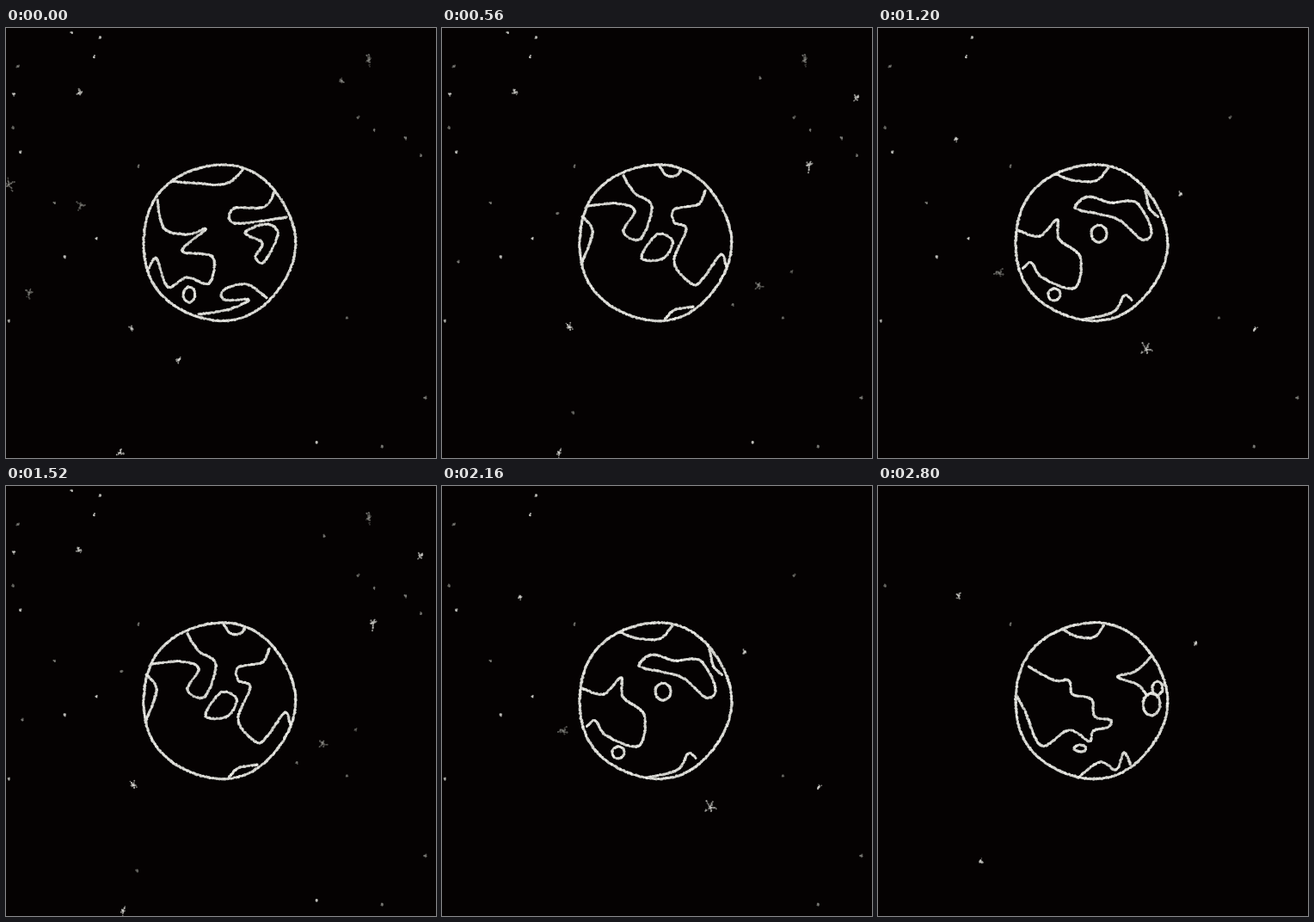
An HTML page with a canvas that plays this animation: 500x500 px, repeating every 2880 ms.

```html
<!DOCTYPE html>
<html lang="en">
<head>
<meta charset="utf-8">
<title>Chalk globe</title>
<style>
  html, body { margin: 0; width: 100%; height: 100%; overflow: hidden; background: #050202; }
  canvas { display: block; }
</style>
</head>
<body>
<canvas id="stage" width="500" height="500"></canvas>
<script>
const ctx = document.getElementById('stage').getContext('2d');
const STEP = 80, STEPS = 12;
const CX = 247.5, CY = 249.5, R = 89.5;
const TAU = Math.PI * 2;

let seed;
function random() {
  seed = (seed * 16807) % 2147483647;
  return seed / 2147483647;
}
const jitter = amount => (random() * 2 - 1) * amount;
const range = n => [...Array(n).keys()];

function triples(text) {
  const n = text.match(/-?\d+/g).map(Number);
  return range(n.length / 3).map(i => n.slice(i * 3, i * 3 + 3));
}

// A hand-drawn line through a few "x y" points.
function coast(text, closed = false) {
  return { closed, points: text.split(', ').map(pair => pair.split(' ').map(Number)) };
}
const island = text => coast(text, true);

function islet(x, y, rx, ry = rx) {
  const points = range(6).map(i => {
    const a = i * TAU / 6 + 0.4;
    return [x + rx * Math.cos(a), y + ry * Math.sin(a)];
  });
  return { closed: true, points };
}

// Polar ice hanging from the rim between two x positions.
function iceCap(x1, x2) {
  const rimY = x => CY - Math.sqrt(R * R - (x - CX) ** 2);
  const width = x2 - x1, edge = 168 + width * 0.16;
  return { closed: false, points: [
    [x1, rimY(x1)], [x1 + width * 0.3, edge - 1], [x1 + width * 0.75, edge], [x2, rimY(x2)]
  ] };
}

// Key views of the globe. turn: degrees per step towards the next view;
// stars: x, y, size (negative is dim); specks: how many faint dots.
const views = [
  {
    at: 0, turn: 8, specks: 20,
    lands: [
      iceCap(193, 276),
      islet(213, 310, 7, 9),
      island('278 238, 303 228, 316 240, 300 272, 290 266, 298 250'),
      coast('312 191, 300 208, 265 210, 266 227, 327 220'),
      coast('176 200, 184 233, 212 240, 232 234, 205 259, 240 266, 236 297, 210 290, 188 301, 175 268, 166 280'),
      coast('303 314, 280 298, 254 304, 254 316, 282 316, 260 327, 224 333')
    ],
    stars: triples('86 75 5, 422 37 -8, 390 61 -4, 3 182 -9, 87 206 -6, 27 308 -7, 146 349 4, 201 386 5, 133 494 7')
  },
  {
    at: 3, turn: 17, specks: 14,
    lands: [
      iceCap(207, 268),
      islet(257, 239, 9, 10),
      islet(205, 310, 7),
      island('230 206, 245 196, 270 203, 300 203, 318 235, 307 246, 278 222, 235 212'),
      coast('311 190, 316 210, 326 220'),
      coast('162 235, 188 242, 208 223, 211 246, 235 266, 229 302, 192 291, 178 273, 168 280'),
      coast('238 339, 274 330, 286 311, 296 317')
    ],
    stars: triples('91 129 4, 352 193 4, 141 285 -8, 438 350 4, 312 374 9')
  },
  {
    at: 7, turn: 21, specks: 26,
    lands: [
      iceCap(253, 278),
      island('232 267, 250 240, 268 248, 257 268'),
      coast('211 172, 224 192, 244 207, 231 245, 211 237, 224 212, 203 204, 170 207'),
      coast('163 219, 175 237, 163 272'),
      coast('306 189, 298 205, 270 211, 270 226, 284 234, 270 272, 291 298, 303 292, 313 278, 325 263, 331 278'),
      coast('260 338, 270 328, 293 324')
    ],
    stars: triples('85 75 5, 422 37 -8, 481 81 6, 427 159 8, 368 299 -8, 148 348 6, 136 494 6')
  },
  {
    at: 11, turn: 17, specks: 2,
    lands: [
      iceCap(215, 263),
      islet(235, 305, 7, 4),
      islet(325, 235, 6, 8),
      islet(318, 254, 10, 13),
      coast('175 210, 205 226, 222 226, 226 242, 248 248, 252 268, 270 272, 268 280, 250 285, 246 297, 222 284, 190 302, 171 262, 162 245'),
      coast('318 198, 300 215, 279 222, 302 231, 312 243'),
      coast('233 339, 258 321, 277 330, 286 310, 294 324')
    ],
    stars: triples('94 128 4, 369 183 3, 119 437 4')
  }
];

seed = 2024;
const specks = range(26).map(() => {
  let x, y;
  do {
    x = random() * 500;
    y = random() * 500;
  } while (Math.hypot(x - CX, y - CY) < 105);
  return [x, y, random() < 0.6 ? -2 : 2];
});

// A slightly uneven circle.
const rim = { closed: true, points: range(36).map(i => {
  const a = i * TAU / 36;
  const r = R - 1.2 * Math.cos(2 * a) + Math.cos(5 * a - 6.5);
  return [CX + r * Math.cos(a), CY + r * Math.sin(a)];
}) };

function dab(x, y, radius, light, alpha) {
  ctx.fillStyle = `rgba(${light}, ${light}, ${light - 5}, ${alpha})`;
  ctx.beginPath();
  ctx.arc(x, y, radius, 0, TAU);
  ctx.fill();
}

const spline = (a, b, c, d, t) =>
  b + 0.5 * t * (c - a + t * (2 * a - 5 * b + 4 * c - d + t * (3 * (b - c) + d - a)));

function chalk({ points, closed }) {
  const n = points.length;
  const pick = i => points[closed ? (i + n) % n : Math.max(0, Math.min(n - 1, i))];
  for (let i = 0; i < (closed ? n : n - 1); i++) {
    const [a, b, c, d] = [-1, 0, 1, 2].map(k => pick(i + k));
    const count = Math.ceil(Math.hypot(c[0] - b[0], c[1] - b[1]) / 1.1);
    for (let k = 0; k < count; k++) {
      const [x, y] = [0, 1].map(j => spline(a[j], b[j], c[j], d[j], k / count));
      dab(x + jitter(0.5), y + jitter(0.5), 1.2 + random() * 0.6, 200 + random() * 45 | 0, 0.85);
    }
  }
}

// Turns a point about the globe's axis; points on the rim stay on it.
function spin([x, y], degrees) {
  const r = Math.sqrt(Math.max(1, R * R - (y - CY) ** 2));
  const s = (x - CX) / r;
  if (!degrees || Math.abs(s) > 0.95) return [x, y];
  const angle = Math.asin(s) - degrees * Math.PI / 180;
  return [CX + r * Math.sin(Math.max(-1.5, Math.min(1.5, angle))), y];
}

// A scribble of short arms; the smallest ones are plain dots.
function drawStar([x, y, s], glow) {
  const size = Math.abs(s), light = s < 0 ? 120 : 205;
  seed = 1 + Math.floor(x * 617 + y * 31);
  for (let arm = 0; arm < 5; arm++) {
    const angle = arm * TAU / 5 + jitter(0.5);
    const reach = size * (0.5 + random() * 0.6);
    for (let d = 0; d < reach; d += 1.2) {
      dab(x + Math.cos(angle) * d * 0.8 + jitter(0.8), y + Math.sin(angle) * d + jitter(0.8),
        0.7 + random() * 0.5, light + jitter(45) | 0, 0.6 * glow);
    }
  }
}

function drawSky(view, glow) {
  for (const star of [...view.stars, ...specks.slice(0, view.specks)]) drawStar(star, glow);
}

function draw(tick) {
  const i = views.findLastIndex(view => view.at <= tick);
  const from = views[i], to = views[(i + 1) % views.length];
  const span = (to.at - from.at + STEPS) % STEPS;
  const passed = tick - from.at, mix = passed / span;
  const near = mix <= 0.5 ? from : to;
  const degrees = from.turn * (near === from ? passed : passed - span);

  ctx.fillStyle = '#050202';
  ctx.fillRect(0, 0, 500, 500);
  drawSky(from, 1 - mix);
  if (mix) drawSky(to, mix);

  seed = 4001 + tick * 7919;
  chalk(rim);
  for (const { points, closed } of near.lands) {
    chalk({ closed, points: points.map(point => spin(point, degrees)) });
  }
}

let shown = -1;
function loop() {
  const tick = Math.floor(performance.now() / STEP) % STEPS;
  if (tick !== shown) draw(shown = tick);
  requestAnimationFrame(loop);
}
loop();
</script>
</body>
</html>
```
